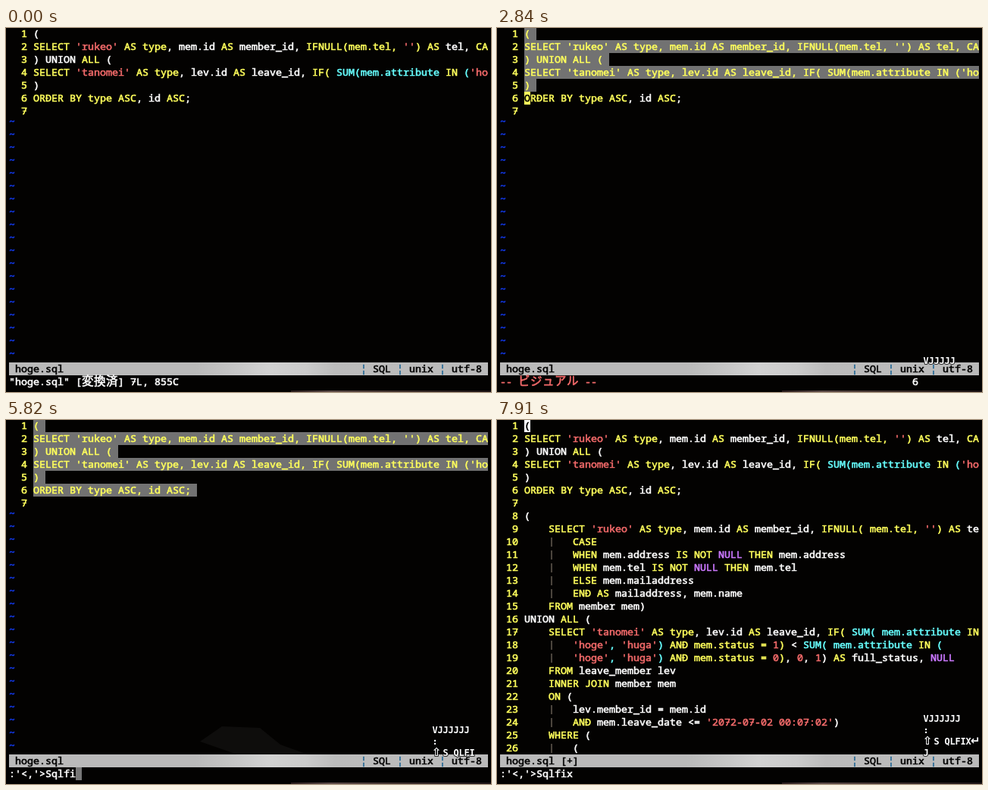
Write an HTML page with a canvas that moves like this. It is 640 px wide and 480 px high and loops after 8 s.

```html
<!DOCTYPE html>
<html lang="ja">
<head>
<meta charset="utf-8">
<title>hoge.sql</title>
<style>
html, body { margin: 0; width: 640px; height: 480px; overflow: hidden; background: #000; }
canvas { display: block; }
</style>
</head>
<body>
<canvas id="stage" width="640" height="480"></canvas>
<script>
const ctx = document.getElementById('stage').getContext('2d');
const LOOP = 8000, LEFT = 4, CW = 8, LH = 17, COLS = 79;
const STATUS = 26, CMD = 27, TEXT = 4;
const YELLOW = '#ffff5c', WHITE = '#fff', RED = '#f26a6a', CYAN = '#67ffff',
      PURPLE = '#cb78ff', BLUE = '#1238e4', GUIDE = '#4a443c', SELECT = '#727272';
const MONO = '13.333px "Noto Sans Mono", "DejaVu Sans Mono", monospace';
const CJK = '500 15.5px "Noto Sans CJK JP", "Noto Sans CJK", sans-serif';
const KEYS = 'bold 12px "DejaVu Sans Mono", monospace';
const ARROWS = 'bold 15px "DejaVu Sans", "DejaVu Sans Mono", sans-serif';

const query = [
  "(",
  "SELECT 'rukeo' AS type, mem.id AS member_id, IFNULL(mem.tel, '') AS tel, CASE",
  ") UNION ALL (",
  "SELECT 'tanomei' AS type, lev.id AS leave_id, IF( SUM(mem.attribute IN ('hoge'",
  ")",
  "ORDER BY type ASC, id ASC;",
  ""
];
const fixed = [
  "(",
  "    SELECT 'rukeo' AS type, mem.id AS member_id, IFNULL( mem.tel, '') AS tel,",
  "    ¦   CASE",
  "    ¦   WHEN mem.address IS NOT NULL THEN mem.address",
  "    ¦   WHEN mem.tel IS NOT NULL THEN mem.tel",
  "    ¦   ELSE mem.mailaddress",
  "    ¦   END AS mailaddress, mem.name",
  "    FROM member mem)",
  "UNION ALL (",
  "    SELECT 'tanomei' AS type, lev.id AS leave_id, IF( SUM( mem.attribute IN (",
  "    ¦   'hoge', 'huga') AND mem.status = 1) < SUM( mem.attribute IN (",
  "    ¦   'hoge', 'huga') AND mem.status = 0), 0, 1) AS full_status, NULL",
  "    FROM leave_member lev",
  "    INNER JOIN member mem",
  "    ON (",
  "    ¦   lev.member_id = mem.id",
  "    ¦   AND mem.leave_date <= '2072-07-02 00:07:02')",
  "    WHERE (",
  "    ¦   ("
];

const rules = [
  [/'[^']*'?/y, RED],
  [/¦/y, GUIDE],
  [/SUM\( ?mem\.attribute|(?<=IN )\(|(?<='hoge'),|(?<='huga')\)/y, CYAN],
  [/IFNULL\( ?mem\.tel,|IF\(|(?<='')\)|mem\.status =|(?<== \d)\)/y, YELLOW],
  [/NULL\b/y, PURPLE],
  [/(SELECT|AS|type|ALL|IN|ORDER|BY|ASC|CASE|WHEN|IS|NOT|THEN|ELSE|END|FROM|INNER|JOIN|ON|AND|WHERE|CA)\b/y, YELLOW],
  [/\d+\b/y, RED],
  [/[\w.]+|./y, WHITE]
];

const colX = c => LEFT + c * CW;
const rowY = r => r * LH - 1;
const since = (times, t) => times.filter(x => t >= x).length;

function box(c, r, n, color) {
  ctx.fillStyle = color;
  ctx.fillRect(colX(c), rowY(r), n * CW, LH);
}

// One glyph per cell, slightly thickened; D and 7 carry a short bar.
function put(s, c, r, color, dy = 13) {
  ctx.fillStyle = ctx.strokeStyle = color;
  ctx.lineWidth = 0.6;
  const y = rowY(r) + dy;
  for (const ch of s) {
    const wide = ch > '\u2fff';
    if (c + (wide ? 2 : 1) > COLS) return c;
    const x = colX(c);
    ctx.font = wide ? CJK : MONO;
    if (ch === '¦' && color === GUIDE) {
      ctx.fillRect(x + 3, rowY(r) + 3, 2, 12);
    } else if (ch !== ' ') {
      ctx.fillText(ch, x, y);
      ctx.strokeText(ch, x, y);
    }
    if (ch === 'D') ctx.fillRect(x, y - 5, 4, 1);
    if (ch === '7') ctx.fillRect(x + 2, y - 5, 5, 1);
    c += wide ? 2 : 1;
  }
  return c;
}

function putCode(line, r) {
  let i = 0;
  while (i < line.length) {
    for (const [re, color] of rules) {
      re.lastIndex = i;
      const m = re.exec(line);
      if (!m) continue;
      put(m[0], TEXT + i, r, color);
      i += m[0].length;
      break;
    }
  }
}

function gradient(x0, x1, stops) {
  const g = ctx.createLinearGradient(x0, 0, x1, 0);
  stops.forEach(([p, c]) => g.addColorStop(p, c));
  return g;
}

function backdrop(t) {
  ctx.fillStyle = '#030201';
  ctx.fillRect(0, 0, 640, 480);
  ctx.fillStyle = gradient(376, 640, [[0, '#2a1c1c'], [0.2, '#5c4a47'], [0.5, '#43332f'], [1, '#1c1315']]);
  ctx.fillRect(376, 478, 264, 2);
  if (t < 4030 || t >= 7160) return;
  ctx.save();
  ctx.beginPath();
  ctx.rect(250, t < 4630 ? 418 : 403, 180, 38);
  ctx.clip();
  ctx.fillStyle = '#0e0d0c';
  ctx.beginPath();
  ctx.moveTo(256, 424);
  ctx.lineTo(285, 404);
  ctx.lineTo(335, 406);
  ctx.lineTo(362, 428);
  ctx.lineTo(398, 441);
  ctx.lineTo(305, 441);
  ctx.fill();
  ctx.restore();
}

function buffer(t) {
  const done = t >= 7160;
  const lines = done ? query.concat(fixed) : query;
  const line = done ? 0 : since([1640, 1940, 2240, 2540, 2840, 2980], t);
  lines.forEach((s, r) => {
    if (r >= STATUS) return;
    put(String(r + 1).padStart(3), 0, r, YELLOW);
    if (r < line) {
      box(TEXT, r, Math.min(s.length + 1, COLS - TEXT), SELECT);
      put(s, TEXT, r, YELLOW);
    } else putCode(s, r);
  });
  for (let r = lines.length; r < STATUS; r++) put('~', 0, r, BLUE, 10);
  if (done || (t >= 750 && t < 3430)) {
    const ch = lines[line][0] || ' ';
    box(TEXT, line, 1, /\w/.test(ch) ? YELLOW : WHITE);
    put(ch, TEXT, line, '#000');
  }
  return line;
}

function statusBar(t) {
  box(0, STATUS, COLS, gradient(LEFT, 636, [
    [0, '#bababa'], [0.39, '#bababa'], [0.46, '#c4c4c4'], [0.54, '#d2d2d2'],
    [0.62, '#cbcbcb'], [0.68, '#bcbcbc'], [1, '#bababa']
  ]));
  put(t >= 7160 ? 'hoge.sql [+]' : 'hoge.sql', 1, STATUS, '#000');
  [['SQL', 58], ['unix', 64], ['utf-8', 71]].forEach(([s, c]) => {
    put('¦', c, STATUS, '#1f6695');
    put(s, c + 2, STATUS, '#000');
  });
}

function commandLine(t, line) {
  if (t < 1200) {
    put('"hoge.sql" [変換済] 7L, 855C', 0, CMD, WHITE);
  } else if (t < 4030) {
    put('-- ビジュアル --', 0, CMD, RED);
    put(String(line + 1), 68, CMD, WHITE);
  } else {
    const typed = since([4630, 4930, 5380, 5520, 5820, 6420], t);
    const end = put(":'<,'>" + 'Sqlfix'.slice(0, typed), 0, CMD, WHITE);
    if (t < 7010) box(end, CMD, 1, '#777');
  }
}

function keyText(s, y) {
  const each = paint => [...s].forEach((ch, i) => {
    const arrow = ch > '\u2000';
    ctx.font = arrow ? ARROWS : KEYS;
    if (ch !== ' ') paint(ch, 562 + i * 7 + (arrow ? 0 : 0.5), y);
  });
  each((...a) => ctx.strokeText(...a));
  each((...a) => ctx.fillText(...a));
}

function keys(t) {
  if (t < 1050) return;
  const rows = ['V' + 'J'.repeat(since([1640, 1940, 2240, 2540, 2690, 2980], t))];
  if (t >= 4030) rows.push(':');
  if (t >= 4630) {
    const n = since([4930, 5230, 5520, 5820, 6270, 7010], t);
    rows.push('⇧ S ' + 'QLFIX↵'.slice(0, n));
  }
  if (t >= 7910) rows.push('J');
  ctx.strokeStyle = 'rgba(0,0,0,0.8)';
  ctx.lineWidth = 2;
  ctx.lineJoin = 'round';
  ctx.fillStyle = WHITE;
  rows.reverse().forEach((s, i) => keyText(s, 443 - i * 15));
}

function draw(t) {
  backdrop(t);
  const line = buffer(t);
  statusBar(t);
  commandLine(t, line);
  keys(t);
}

const start = performance.now();
function tick() {
  draw((performance.now() - start) % LOOP);
  requestAnimationFrame(tick);
}
tick();
</script>
</body>
</html>
```
